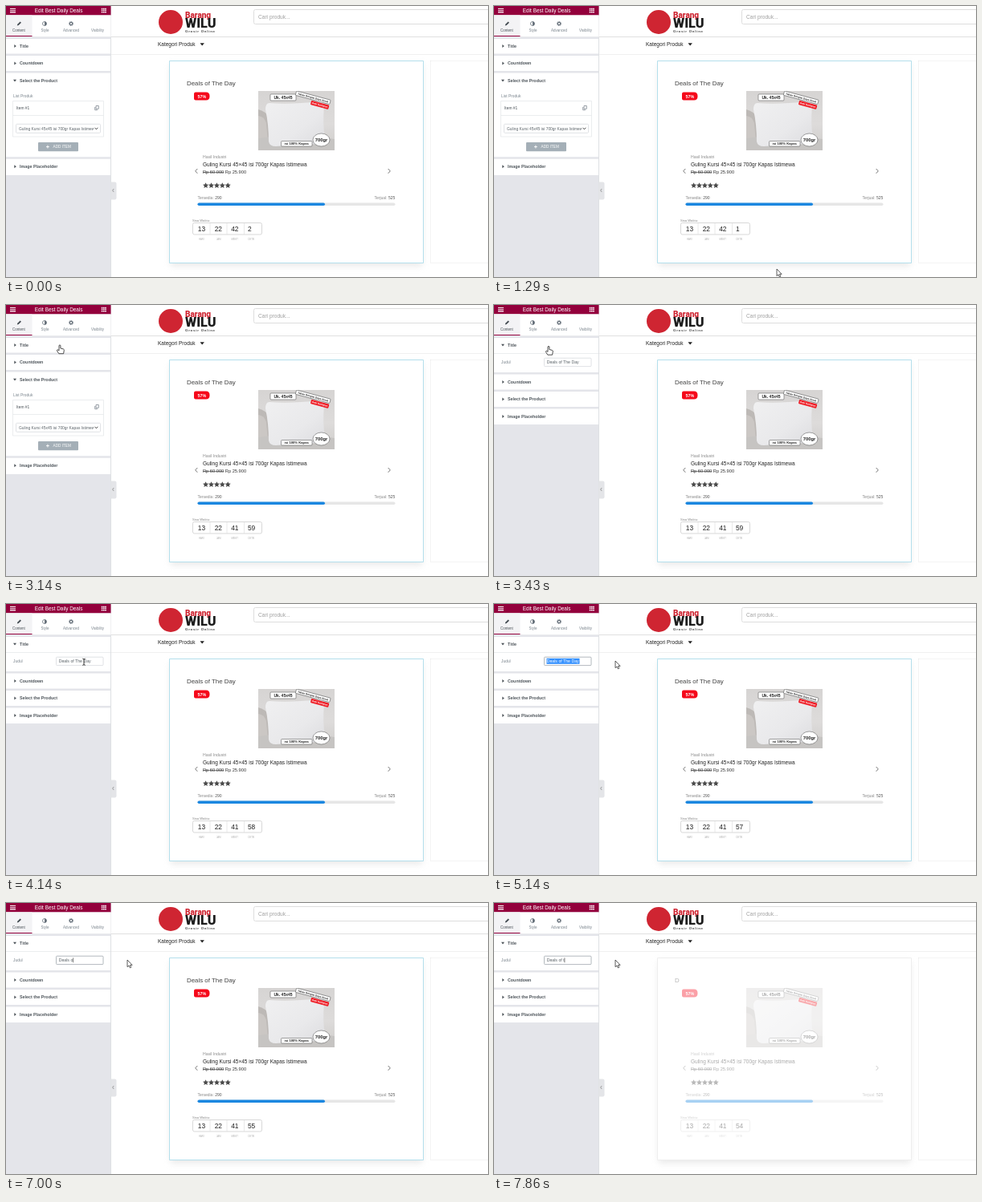
Recreate the animation shown at these times as an HTML page. Size 600 px wide and 338 px high, loop 8000 ms.

```html
<!DOCTYPE html>
<html lang="id">
<head>
<meta charset="utf-8">
<title>Daily deals editor</title>
<style>
html, body { margin: 0; width: 100%; height: 100%; overflow: hidden; background: #fff; }
svg { display: block; width: 600px; height: 338px; font-family: "Liberation Sans", Arial, sans-serif; }
text { white-space: pre; }
.head { font-size: 5.35px; font-weight: 700; fill: #4f565c; }
.tab { font-size: 4.5px; text-anchor: middle; fill: #7a848d; }
.label { font-size: 4.9px; fill: #7a848d; }
.gap { stroke: #e4e5ea; stroke-width: 2.4; }
.thin { stroke: #e3e6e8; stroke-width: .7; fill: none; }
.field { fill: #fff; stroke: #d8dbdf; stroke-width: .8; }
.tiny { font-size: 2.7px; fill: #aaa; }
.small { font-size: 5px; fill: #888; }
.tag { fill: #fff; stroke: #444; stroke-width: .5; }
.tagText { font-weight: 700; fill: #222; text-anchor: middle; }
</style>
</head>
<body>
<svg viewBox="0 0 600 338">
  <defs>
    <linearGradient id="wall" x2="0" y2="1">
      <stop stop-color="#d6d4d3"/><stop offset=".55" stop-color="#dddbda"/><stop offset="1" stop-color="#cfcdcb"/>
    </linearGradient>
    <linearGradient id="cushion" x2="1" y2="1">
      <stop stop-color="#f0f0f1"/><stop offset=".6" stop-color="#e9e9eb"/><stop offset="1" stop-color="#dcdcdf"/>
    </linearGradient>
    <filter id="soft" x="-10%" y="-10%" width="120%" height="125%"><feGaussianBlur stdDeviation="4"/></filter>
    <clipPath id="photo"><path d="M314 106h95v74h-95z"/></clipPath>
    <clipPath id="option"><path d="M14 147h95v12h-95z"/></clipPath>
  </defs>
  <path d="M0 0h600v338H0z" fill="#fff"/>

  <!-- shop header -->
  <circle cx="205" cy="20" r="15" fill="#cf2532"/>
  <g font-family="Roboto, sans-serif">
    <text x="223" y="14.5" font-size="10" font-weight="800" fill="#cf2532">Barang</text>
    <text x="223" y="27" font-size="16.3" font-weight="900" fill="#1d1d1d">WILU</text>
  </g>
  <text x="223" y="33" font-size="4.4" font-weight="700" letter-spacing=".75" fill="#444">Grosir Online</text>
  <rect x="308.5" y="4.5" width="310" height="18" rx="2" fill="#fff" stroke="#dedede"/>
  <text x="314" y="15.8" font-size="6.6" fill="#a0a0a0">Cari produk...</text>
  <path d="M131 38.5h469" stroke="#e0e0e0"/>
  <path d="M131 60.5h469" stroke="#f0f0f0"/>
  <text x="189" y="50.2" font-size="6.5" fill="#222">Kategori Produk</text>
  <path d="M241.5 46.3h5.4l-2.7 3.3z" fill="#222"/>

  <!-- card -->
  <path d="M528.5 68.5H610V320.5h-81.5z" fill="#fff" stroke="#e2e2e2" stroke-width=".8" stroke-dasharray="1 1"/>
  <path d="M205 73h313v251H205z" fill="#dedede" filter="url(#soft)" opacity=".7"/>
  <path d="M203.5 68.5h316v252h-316z" fill="#fff" stroke="#eee"/>
  <g id="card">
    <path id="edge" d="M203.5 68.5h316v252h-316z" fill="none" stroke="#b4dfec"/>
    <text id="title" x="225" y="99" font-size="7.9" fill="#444"></text>
    <path d="M236 107.5h13q4.5 0 4.5 5t-4.5 5H236q-2 0-2-2v-6q0-2 2-2z" fill="#f5081a"/>
    <text x="243.8" y="114.5" font-size="5.3" font-weight="700" text-anchor="middle" fill="#fff">57%</text>

    <g clip-path="url(#photo)">
      <path d="M314 106h95v74h-95z" fill="url(#wall)"/>
      <path d="M314 129q9 2 13 10l5 41h-18z" fill="#bdb9b6"/>
      <path d="M314 137q8 1 10 9l3 34h-13z" fill="#cbc7c4"/>
      <path d="M314 165q46-7 95 1v14h-95z" fill="#c6c4c2"/>
      <path d="M328 121q27 2 62-2q6 0 6 6q-2 21 1 40q0 7-7 7q-27 1-54 3q-8 0-9-6q0-21-4-40q0-8 5-8z" fill="url(#cushion)"/>
      <rect class="tag" x="329" y="110" width="32" height="8" rx="1"/>
      <text class="tagText" x="345" y="115.8" font-size="5">Uk. 45x45</text>
      <g transform="rotate(15 382 115)">
        <rect class="tag" x="360" y="111.5" width="44" height="5.5" rx="1"/>
        <text class="tagText" x="382" y="115.5" font-size="3.2">Tahan Dengan Daya Serat</text>
        <rect x="381" y="118.2" width="23" height="5.3" rx="1" fill="#ee1c25"/>
        <text class="tagText" x="392.5" y="122" font-size="3.3" style="fill:#fff">Anti Kempes</text>
      </g>
      <rect class="tag" x="342.5" y="168.5" width="38.5" height="6.5" rx="1"/>
      <text class="tagText" x="361.7" y="173.2" font-size="4.2">isi 100% Kapas</text>
      <ellipse class="tag" cx="392.5" cy="167" rx="10.5" ry="8"/>
      <text class="tagText" x="392.5" y="169.2" font-size="5.8">700gr</text>
    </g>

    <text x="245" y="190" font-size="5.1" fill="#888">Hasil Industri</text>
    <text x="245" y="199.8" font-size="6.5" fill="#222">Guling Kursi 45×45 isi 700gr Kapas Istimewa</text>
    <text x="245" y="209" font-size="5.7" fill="#333"><tspan text-decoration="line-through">Rp 60.000</tspan> Rp 25.900</text>
    <path d="M238.3 203l-2.6 2.9l2.6 2.9M475.7 203l2.6 2.9l-2.6 2.9" fill="none" stroke="#666" stroke-width=".9"/>
    <g id="stars" fill="#4a4a4a"></g>
    <text class="small" x="238.5" y="241.3">Tersedia: <tspan fill="#555">290</tspan></text>
    <text class="small" x="484.3" y="241.3" text-anchor="end">Terjual: <tspan fill="#555">525</tspan></text>
    <rect x="238.5" y="245.5" width="246" height="3.6" rx="1.8" fill="#e6e6e6"/>
    <rect x="238.5" y="245.5" width="158.5" height="3.6" rx="1.8" fill="#1b87e0"/>
    <text x="232" y="268.6" font-size="4.2" fill="#888">Sisa Waktu:</text>
    <rect x="232.5" y="270.5" width="86" height="14.5" rx="2" fill="none" stroke="#cfcfcf" stroke-width=".8"/>
    <path d="M254 271v14M275 271v14M296.5 271v14" stroke="#e2e2e2" stroke-width=".8"/>
    <g id="clock" font-size="8.4" fill="#222"></g>
    <text class="tiny" y="292.3"><tspan x="240">HARI</tspan><tspan x="262">JAM</tspan><tspan x="280.5">MENIT</tspan><tspan x="301.5">DETIK</tspan></text>
  </g>

  <!-- editor panel -->
  <path d="M0 0h130.5v338H0z" fill="#e4e5ea"/>
  <path d="M130.5 0v338" stroke="#dadbdf" stroke-width=".8"/>
  <path d="M130.5 219.5h5q2 0 2 2v18q0 2-2 2h-5z" fill="#e4e5e8"/>
  <path d="M134.2 228l-1.6 2l1.6 2" fill="none" stroke="#777" stroke-width=".7"/>
  <path d="M0 0h130.5v11.5H0z" fill="#93003c"/>
  <path d="M5 3.5h7M5 5.7h7M5 7.9h7" stroke="#fff" stroke-width="1.1"/>
  <path d="M118.8 3.4h6M118.8 5.6h6M118.8 7.8h6" stroke="#fff" stroke-width="1.5" stroke-dasharray="1.6 .6"/>
  <text x="65.7" y="7.8" font-size="6.4" text-anchor="middle" fill="#fff">Edit Best Daily Deals</text>
  <path d="M0 11.5h130.5V38.5H0z" fill="#fff"/>
  <path d="M0 11.5h32.5V38H0z" fill="#f3f3f5"/>
  <path d="M0 37.5h32.5" stroke="#93003c"/>
  <path d="M13.8 24.6l.5-1.9l3.3-3.3l1.4 1.4l-3.3 3.3z" fill="#444c52"/>
  <circle cx="48" cy="22" r="2.5" fill="none" stroke="#66707a" stroke-width=".8"/>
  <path d="M48 19.5a2.5 2.5 0 0 1 0 5z" fill="#66707a"/>
  <circle cx="81" cy="22" r="1.7" fill="none" stroke="#66707a" stroke-width="1.2"/>
  <circle cx="81" cy="22" r="2.6" fill="none" stroke="#66707a" stroke-dasharray="1.02 1.02"/>
  <text class="tab" x="16" y="32" style="fill:#4a5157">Content</text>
  <text class="tab" x="48.5" y="32">Style</text>
  <text class="tab" x="81" y="32">Advanced</text>
  <text class="tab" x="114" y="32">Visibility</text>

  <g id="productPane">
    <path d="M0 39h130v172H0z" fill="#fff"/>
    <path class="gap" d="M0 39.7h130M0 60.7h130M0 82.3h130M0 189.5h130"/>
    <text class="label" x="9" y="113.5">List Produk</text>
    <path class="thin" d="M8.5 118.5h113v44.5H8.5zM8.5 136.5h113"/>
    <text class="label" x="13" y="129.2" style="fill:#4a5157">Item #1</text>
    <path d="M112 124.5h3.3v3.7H112zM110.7 126v3.7h3.3" fill="none" stroke="#6d7882" stroke-width=".7"/>
    <rect class="field" x="12.5" y="147.3" width="105" height="11" rx="1"/>
    <text x="16" y="154.7" font-size="4.9" fill="#5a6268" clip-path="url(#option)">Guling Kursi 45x45 isi 700gr Kapas Istimewa</text>
    <path d="M110.5 151.8l1.9 2l1.9-2" fill="none" stroke="#333" stroke-width=".9"/>
    <rect x="40" y="170" width="50" height="11.2" rx="1" fill="#a4afb7"/>
    <path d="M50 175.6h3.8M51.9 173.7v3.8" stroke="#fff" stroke-width=".9"/>
    <text x="58.5" y="177.3" font-size="4.7" fill="#fff">ADD ITEM</text>
  </g>
  <g id="titlePane">
    <path d="M0 39h130v110H0z" fill="#fff"/>
    <path class="gap" d="M0 39.7h130M0 85.3h130M0 106.8h130M0 128.3h130"/>
    <path class="thin" d="M0 60.5h130"/>
    <text class="label" x="9" y="73">Judul</text>
    <rect id="box" class="field" x="62.5" y="66.2" width="58.5" height="10.4" rx="1"/>
    <rect id="mark" x="65.5" y="67.8" height="7" fill="#3390ff"/>
    <text id="input" x="65.7" y="73.3" font-size="5.2"></text>
    <path id="caret" d="M0 68.3v6" stroke="#333" stroke-width=".6"/>
  </g>
  <g id="arrow"><path d="M0 0v8.7l2-1.7l1.3 2.9l1.5-.7l-1.3-2.8h2.6z" fill="#fff" stroke="#333" stroke-width=".8"/></g>
  <g id="hand"><path d="M-1 .9q1-1 1.9 0v3.6l3.5.9q1.1.4.9 1.7l-.7 4.1H-1.2L-3.6 7.3q.2-1.4 1.4-.9L-1 7.4z" fill="#fff" stroke="#222" stroke-width=".8"/></g>
  <g id="beam"><path d="M-1.7-3.8Q0-3.8 0-2.9Q0-3.8 1.7-3.8M0-3v6.5M-1.7 4.3Q0 4.3 0 3.4Q0 4.3 1.7 4.3" fill="none" stroke="#222" stroke-width=".9"/></g>
</svg>
<script>
const LOOP = 8000, RATE = 7;
const $ = id => document.getElementById(id);
const show = (id, on) => { $(id).style.display = on ? "" : "none"; };
const add = (parent, name, attrs) => {
  const el = document.createElementNS("http://www.w3.org/2000/svg", name);
  for (const key in attrs) el.setAttribute(key, attrs[key]);
  return parent.appendChild(el);
};

function heading(pane, label, y, open) {
  const d = open ? `M9 ${y - 1.2}h4l-2 2.6z` : `M10.3 ${y - 2}v4l2.5-2z`;
  add(pane, "path", { d, fill: "#4a5157" });
  add(pane, "text", { x: 17, y: y + 1.9, class: "head" }).textContent = label;
}
const sections = ["Title", "Countdown", "Select the Product", "Image Placeholder"];
[50, 71.5, 93, 200.3].forEach((y, i) => heading($("productPane"), sections[i], y, i === 2));
[50, 96, 117.5, 139].forEach((y, i) => heading($("titlePane"), sections[i], y, i === 0));

for (let i = 0; i < 5; i++) {
  const points = Array.from({ length: 10 }, (_, j) => {
    const r = j % 2 ? 1.8 : 3.7, a = (j * 36 - 90) * Math.PI / 180;
    return [248.6 + i * 6.9 + r * Math.cos(a), 223.9 + r * Math.sin(a)].map(v => v.toFixed(2)).join();
  });
  add($("stars"), "polygon", { points: points.join(" ") });
}
const digits = [238.8, 259.7, 280.2, 300.9].map(x => add($("clock"), "text", { x, y: 280.8 }));

// pointer: step, x, y
const path = [
  [8, 568, 322], [9, 352, 328], [10, 322, 292], [12, 215, 174], [14, 108, 80], [15, 79, 56],
  [17, 69, 51], [22, 67, 49.5], [24, 68, 51], [27, 90, 68], [29, 97, 72], [30, 92, 72],
  [32, 66, 71], [34, 112, 71], [36, 151, 71]
];
function pointer(step) {
  const i = path.findIndex(p => p[0] >= step);
  if (i < 0) return path[path.length - 1].slice(1);
  if (i === 0) return path[0].slice(1);
  const [a, ax, ay] = path[i - 1], [b, bx, by] = path[i], f = (step - a) / (b - a);
  return [ax + (bx - ax) * f, ay + (by - ay) * f];
}

const oldTitle = "Deals of The Day", newTitle = "Deals of the Day";
const OPEN = 23, FOCUS = 32, TYPE = 43, RENDER = 50, RESUME = 53;

function draw(step) {
  // minutes and seconds left, one tick per RATE steps
  const left = 42 * 60 + 2 - Math.floor((step + 1) / RATE);
  [13, 22, Math.floor(left / 60), left % 60].forEach((v, i) => { digits[i].textContent = v; });

  show("productPane", step < OPEN);
  show("titlePane", step >= OPEN);
  const [x, y] = pointer(step);

  const typing = step >= TYPE;
  const count = Math.min(step - TYPE + 1, 7) + Math.max(0, step - RESUME + 1);
  const input = $("input");
  input.textContent = typing ? newTitle.slice(0, count) : oldTitle;
  const marked = step >= FOCUS && !typing;
  show("mark", marked);
  $("mark").setAttribute("width", Math.max(0, Math.min(41, x - 65.5)));
  input.setAttribute("fill", marked && step > FOCUS ? "#fff" : "#5a6268");
  $("box").style.stroke = step >= FOCUS ? "#a0a7ae" : "";
  show("caret", typing && step !== 51 && step !== 52);
  if (typing) $("caret").setAttribute("transform", `translate(${66 + input.getComputedTextLength()})`);

  const loading = step >= TYPE && step < TYPE + 3 || step >= RESUME;
  $("card").setAttribute("opacity", loading ? .38 : 1);
  show("edge", step < RENDER && !loading);
  $("title").textContent = step < RENDER ? oldTitle : "D";

  const kind = x > 130 ? "arrow" : step > OPEN && y > 65 ? "beam" : "hand";
  for (const id of ["arrow", "hand", "beam"]) {
    show(id, step >= 8 && id === kind);
    $(id).setAttribute("transform", `translate(${x} ${y})`);
  }
}

const start = performance.now();
function tick() {
  const t = (performance.now() - start) % LOOP;
  draw(Math.floor((t + 4) * RATE / 1000));
  requestAnimationFrame(tick);
}
tick();
</script>
</body>
</html>
```
